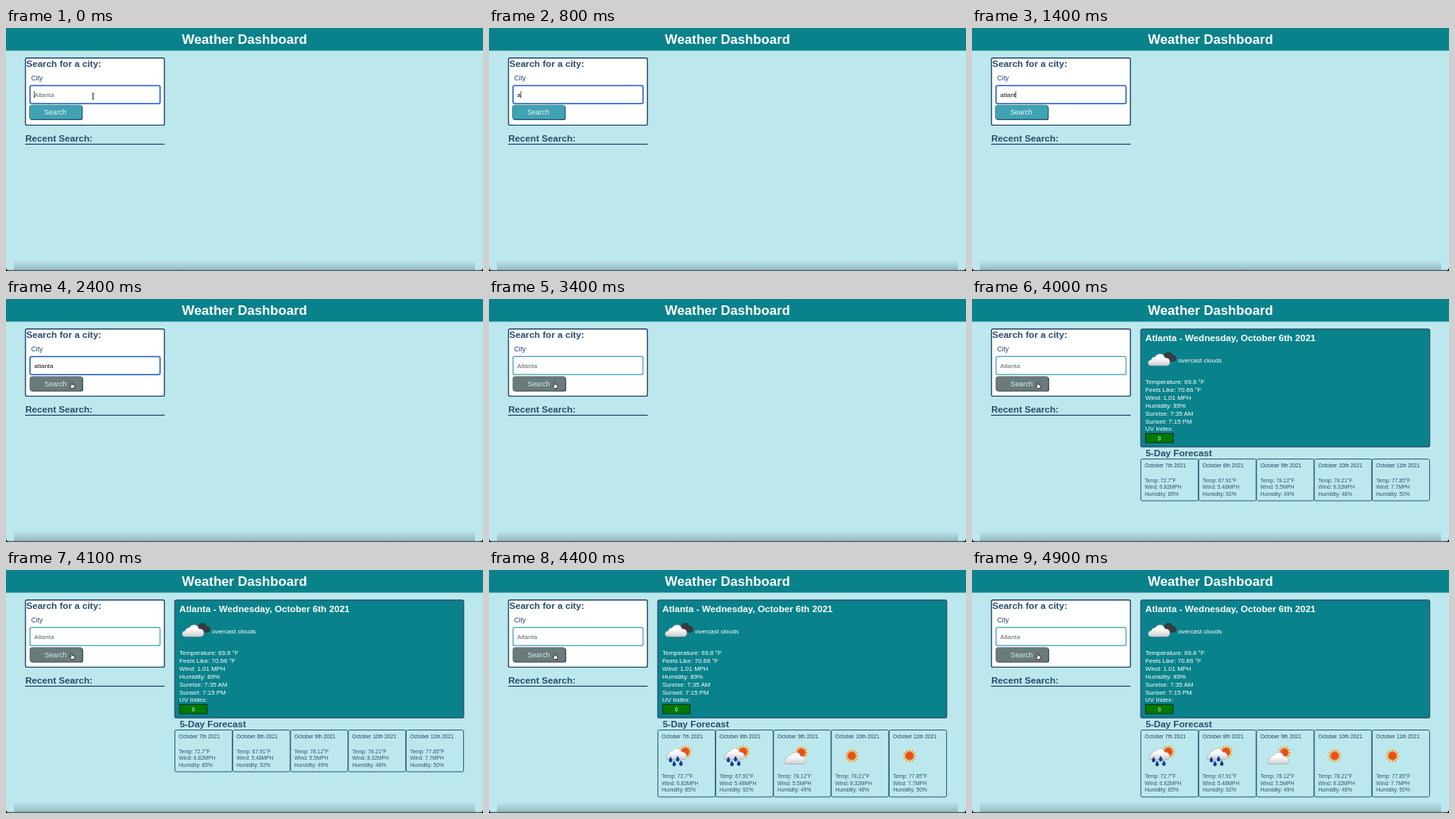
Animation of 600 by 306 pixels, one loop 5 s. Source, as an HTML page:

```html
<!DOCTYPE html>
<html lang="en">
<head>
<meta charset="utf-8">
<title>Weather Dashboard</title>
<style>
  html, body { margin: 0; width: 100%; height: 100%; overflow: hidden; background: #bce8ed; }
  svg { display: block; width: 100%; height: 100%; }
  text { font-family: "Liberation Sans", Arial, sans-serif; font-size: 7.95px; white-space: pre; }
  .heading { font-size: 11.65px; font-weight: bold; fill: #2a4b6b; }
  .card { fill: #0a828b; stroke: #2a4f70; stroke-width: 1.3; }
  .light text, .light .heading { fill: #fff; }
  .cell rect { fill: none; stroke: #2b5b7d; }
  .cell text { font-size: 6.6px; fill: #34546f; }
  .cell .date { font-size: 6.7px; fill: #24425f; }
</style>
</head>
<body>
<svg viewBox="0 0 600 306" preserveAspectRatio="none">
  <defs>
    <linearGradient id="shade" x2="0" y2="1">
      <stop offset="0" stop-color="#6d8a92" stop-opacity="0"/>
      <stop offset="1" stop-color="#6d8a92" stop-opacity=".5"/>
    </linearGradient>
    <linearGradient id="puff" x2="0" y2="1">
      <stop offset=".35" stop-color="#fff"/>
      <stop offset="1" stop-color="#c9cccf"/>
    </linearGradient>
    <path id="cloud" d="M4 15Q0 15 0 11.5Q0 8 4 7.5Q5 3.5 8.5 4Q11 0 15 0Q20 0 21 5Q27 5 27.5 10Q27.5 15 23 15Z"/>
    <g id="sun">
      <path id="rays" fill="#f3a02c"/>
      <circle r="5" fill="#e94e20"/>
    </g>
    <g id="cloudy">
      <use href="#sun" x="35" y="28.5"/>
      <use href="#cloud" x="13" y="28" fill="url(#puff)" stroke="#9ba5aa" stroke-width=".6"/>
    </g>
    <g id="rain">
      <use href="#sun" x="34.5" y="27.5"/>
      <use href="#cloud" transform="translate(10 23) scale(.95)" fill="url(#puff)" stroke="#9ba5aa" stroke-width=".6"/>
      <path id="drops" fill="#123b9c" stroke="#0a2468" stroke-width=".4"/>
    </g>
    <g id="clear"><use href="#sun" x="25.6" y="32.5"/></g>
  </defs>

  <rect width="600" height="306" fill="#bce8ed"/>
  <rect width="600" height="28.5" fill="#0a828b"/>
  <text x="300" y="20" text-anchor="middle" class="heading" style="font-size:16.7px;fill:#fff">Weather Dashboard</text>

  <rect x="24.5" y="37.8" width="174.8" height="84.6" rx="2" fill="#fff" stroke="#264a6c" stroke-width="1.4"/>
  <text x="25.4" y="49.3" class="heading">Search for a city:</text>
  <text x="31.8" y="66" fill="#23446b" style="font-size:8.4px">City</text>
  <rect id="field" x="30.2" y="72.4" width="163.6" height="22.8" rx="2" fill="#fff"/>
  <text id="entry" x="35.6" y="87"></text>
  <path id="caret" d="M0 79.5V88" stroke="#222" stroke-width=".8"/>

  <g id="button">
    <rect x="30.3" y="98" width="66.2" height="18" rx="2.5" fill="#2c4c5c"/>
    <rect id="face" x="29.5" y="97.2" width="66" height="17.8" rx="2.5"/>
    <text id="label" x="48" y="109.2" style="font-size:8.8px">Search</text>
  </g>

  <text x="24.2" y="142.6" class="heading">Recent Search:</text>
  <path d="M24 146.4H199.6" stroke="#264a6c" stroke-width="1.3"/>

  <g id="results">
    <rect id="panel" class="card" x="212.3" y="37.8" width="363.4" rx="2"/>
    <g class="light">
      <text x="218" y="53.3" class="heading">Atlanta - Wednesday, October 6th 2021</text>
      <text id="sky" x="259.2">overcast clouds</text>
      <g id="facts"></g>
    </g>
    <g id="overcast">
      <use href="#cloud" transform="translate(236 67) scale(.75)" fill="#3b3b3d" stroke="#222" stroke-width=".6"/>
      <use href="#cloud" transform="translate(221.5 69)" fill="url(#puff)" stroke="#8f979b" stroke-width=".6"/>
    </g>
    <g id="later">
      <g class="light">
        <text x="218" y="166.3">UV Index:</text>
        <rect x="218.3" y="169.3" width="34.6" height="11.6" fill="#007b00" stroke="#17251c"/>
        <text x="235.6" y="177.6" text-anchor="middle" style="font-size:7px">0</text>
      </g>
      <text x="218.4" y="198.2" class="heading">5-Day Forecast</text>
      <g id="forecast"></g>
    </g>
  </g>

  <rect x="10" y="292" width="580" height="13" fill="url(#shade)"/>
  <path d="M0 305.4H600" stroke="#4a5f66" stroke-width="1.1"/>
  <path d="M0 301Q0 306 5 306H0ZM600 301Q600 306 595 306H600Z" fill="#000"/>

  <path id="beam" d="M-1.5-4Q0-4 0-3V3Q0 4-1.5 4M1.5-4Q0-4 0-3V3Q0 4 1.5 4" fill="none" stroke="#222" stroke-width=".8"/>
  <path id="hand" d="M-1.2-3.5Q-.2-4.3.3-3.2V-1.2L2.6-.8Q3.6-.5 3.4.8L2.8 3.6H-.6L-2.8.9Q-2.8-.4-1.2.4Z" fill="#fff" stroke="#111" stroke-width=".8"/>
</svg>
<script>
const $ = id => document.getElementById(id);
const show = (id, on) => $(id).style.display = on ? '' : 'none';
const set = (id, attrs) => { for (const k in attrs) $(id).setAttribute(k, attrs[k]); };
const place = (id, x, y) => set(id, { transform: `translate(${x} ${y})` });
const lines = (list, x, y, step) =>
  list.map((s, i) => `<text x="${x}" y="${y + i * step}">${s}</text>`).join('');

// Pointed rays: alternate an outer and an inner radius
$('rays').setAttribute('d', 'M' + Array.from({ length: 24 }, (_, i) => {
  const r = i % 2 ? 5.2 : 9.5, a = i * Math.PI / 12;
  return (r * Math.cos(a)).toFixed(2) + ' ' + (r * Math.sin(a)).toFixed(2);
}).join('L') + 'Z');
$('drops').setAttribute('d', [[16, 34], [25, 33], [20.5, 39], [29, 38.5]]
  .map(([x, y]) => `M${x} ${y}q-4 6 0 6.4q4-.4 0-6.4z`).join(''));

$('facts').innerHTML = lines(['Temperature: 69.8 °F', 'Feels Like: 70.66 °F', 'Wind: 1.01 MPH',
  'Humidity: 89%', 'Sunrise: 7:35 AM', 'Sunset: 7:15 PM'], 218, 0, 10);

const days = [
  ['rain', 72.7, 6.82, 85], ['rain', 67.91, 5.48, 92], ['cloudy', 78.12, 5.5, 49],
  ['clear', 78.21, 8.32, 48], ['clear', 77.85, 7.7, 50]
];
$('forecast').innerHTML = days.map(([icon, temp, wind, humidity], i) => `
  <g class="cell" transform="translate(${212.4 + i * 72.75} 201.5)">
    <rect class="frame" width="72.2" rx="2"/>
    <text class="date" x="4.9" y="10.8">October ${7 + i}th 2021</text>
    <use class="icon" href="#${icon}"/>
    <g class="stats">${lines([`Temp: ${temp}°F`, `Wind: ${wind}MPH`, `Humidity: ${humidity}%`], 4.9, 0, 8.6)}</g>
  </g>`).join('');

const clamp = v => Math.min(1, Math.max(0, v));
const mix = (a, b, p) => `rgb(${a.map((v, i) => Math.round(v + (b[i] - v) * p))})`;
const keyTimes = [800, 900, 1100, 1200, 1300, 1400, 1500];

function drawForm(t) {
  const cleared = t >= 3000, focused = t < 2900;
  const typed = cleared ? '' : 'atlanta'.slice(0, keyTimes.filter(k => t >= k).length);
  $('entry').textContent = typed || 'Atlanta';
  set('entry', { fill: typed ? '#111' : '#5c6266' });
  set('field', { stroke: focused ? '#2560bd' : '#3fa2b4', 'stroke-width': focused ? 1.5 : 1.2 });
  const width = typed ? $('entry').getComputedTextLength() : 0;
  place('caret', 35.6 + width, 0);
  show('caret', t < 100 || t >= 600 && t < 2000);

  const hover = clamp((t - 2100) / 300);
  set('face', { fill: mix([63, 163, 180], [107, 122, 122], hover),
    stroke: mix([44, 110, 128], [79, 91, 94], hover), 'stroke-width': .7 });
  set('label', { fill: mix([232, 247, 249], [205, 238, 241], hover) });
  place('button', .6 * hover, .5 * hover);
}

function drawPointer(t) {
  const p = clamp((t - 1800) / 500), ease = p * p * (3 - 2 * p);
  const x = 109.5 - 26.5 * ease, y = 85.8 + 23.2 * ease;
  const overButton = y > 96;
  place('beam', x, y);
  place('hand', x, y);
  show('beam', !overButton && (t < 800 || t >= 1800));
  show('hand', overButton);
}

function drawResults(t) {
  const icon = t >= 3900, full = t >= 4000, icons = t >= 4300;
  show('results', t >= 3700);
  show('overcast', icon);
  show('later', full);
  set('sky', { y: icon ? 79.6 : 65 });
  place('facts', 0, icon ? 106.6 : 75.6);
  set('panel', { height: full ? 148.4 : icon ? 126 : 95 });
  for (const cell of $('forecast').children) {
    cell.querySelector('.frame').setAttribute('height', icons ? 84.3 : 52.6);
    cell.querySelector('.icon').style.display = icons ? '' : 'none';
    cell.querySelector('.stats').setAttribute('transform', `translate(0 ${icons ? 60.7 : 29})`);
  }
}

const start = performance.now();
function frame() {
  const elapsed = (performance.now() - start) % 5000;
  const t = Math.floor(elapsed / 100) * 100;
  drawForm(t);
  drawPointer(t);
  drawResults(t);
  requestAnimationFrame(frame);
}
frame();
</script>
</body>
</html>
```
